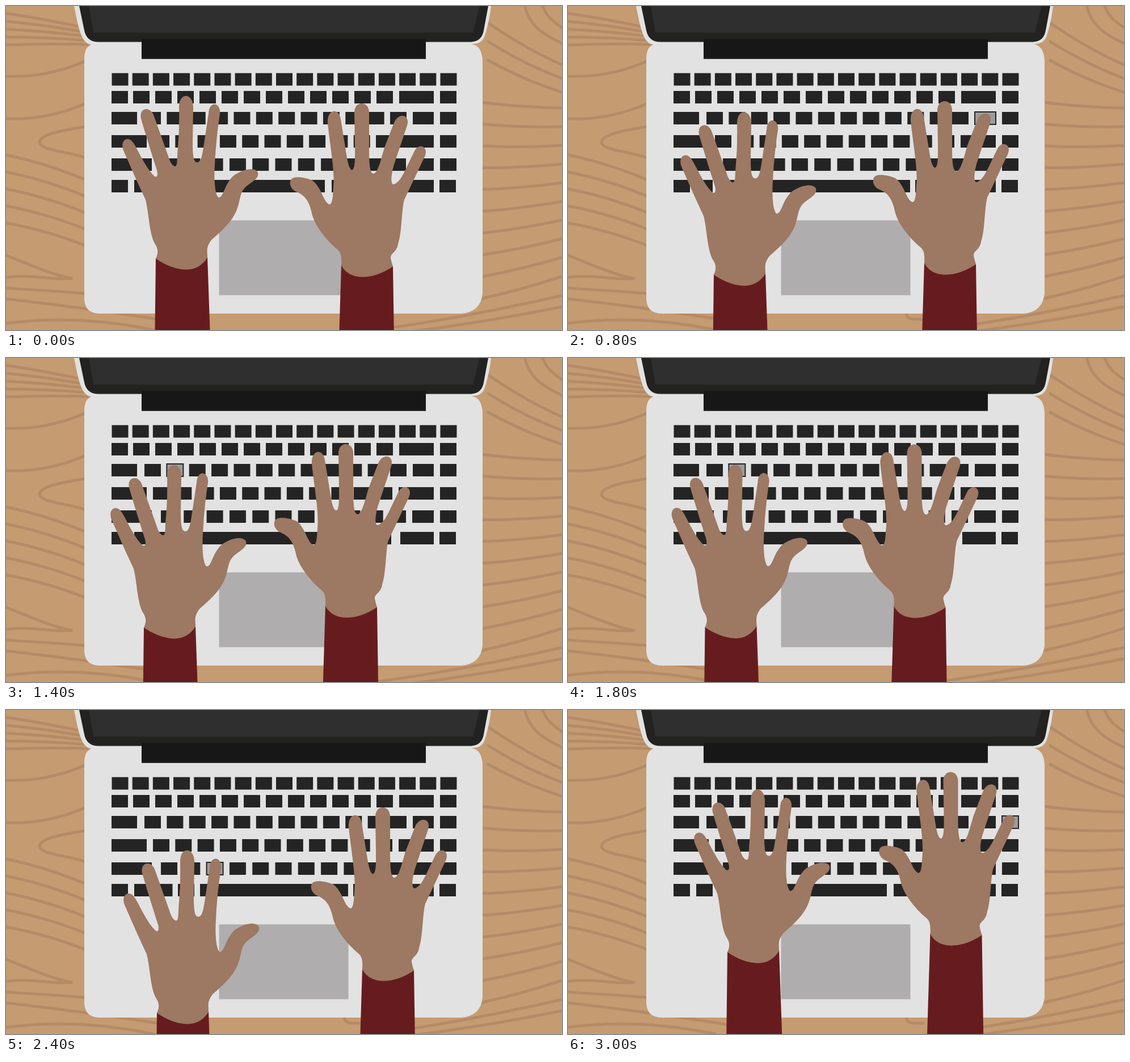
Recreate the animation shown at these times as an HTML page. Size 980 by 572 pixels, loop 3200 ms.

```html
<!DOCTYPE html>
<html>
<head>
<meta charset="utf-8">
<title>Typing hands</title>
<style>
html, body { margin: 0; width: 100%; height: 100%; overflow: hidden; background: #c59b72; }
svg { display: block; }
#grain { fill: none; stroke: #b58a67; stroke-width: 5; stroke-linecap: round; }
.sleeve { fill: #661c1e; }
.skin { fill: #9d7862; }
</style>
</head>
<body>
<svg width="980" height="572" viewBox="0 0 980 572">
  <rect width="980" height="572" fill="#c59b72"/>
  <g id="grain">
    <path d="M140,213C95,220 60,227 59,241C62,255 105,256 140,268M0,440C40,456 85,476 117,481C80,484 40,473 0,479M597,540C595,555 608,553 626,553M915,0C921,35 950,52 980,66M946,0C952,18 965,28 980,38"/>
  </g>
  <path fill="#e2e2e2" d="M120,0C127,34 132,68 151,68Q138,72 138,94V517Q139,543 165,543H803Q837,540 840,507V100Q840,70 820,67Q839,68 844,52Q852,27 855,0Z"/>
  <path fill="#222220" d="M129,0L138,43Q142,63.500 163,63.500H820Q839,62 842,43L850,0Z"/>
  <path fill="#2f2f2f" d="M146,0L154,47H823L835,0Z"/>
  <path fill="#171717" d="M239,58H740V93.500H239Z"/>
  <path fill="#afadae" d="M375.500,378.500H603.500V510.500H375.500Z"/>
  <g id="keys" fill="#242424"></g>
  <rect id="lit" height="22" fill="#9c9c9b" stroke="#242424" stroke-width="2"/>
  <g id="left">
    <path class="sleeve" d="M264,445L355,443L364,700H261Z"/>
    <path class="skin" d="M264,446C269,436 268,427 262,419C252,400 252,365 246,342Q238,325 228,303L207,255C203,245 206,236 213,235C220,234 224,240 229,249C240,270 250,290 262,301C267,303 268,298 266,290C258,265 247,230 238,199C234,180 253,176 260,192L286,265Q291,282 298,283C303,282 301,270 303,250Q306,215 305,180C304,152 329,152 330,178L329,240C329,262 330,276 337,276C344,276 346,262 348,250L357,190C358,166 379,170 377,190Q370,235 368,280C366,310 369,336 375,338C384,338 385,312 403,298C420,287 436,285 443,292C449,303 434,310 424,318C412,328 413,342 409,353C402,379 380,397 362,413C352,427 355,432 355,444Q342,465 318,465.500Q292,465 264,446Z"/>
  </g>
  <g id="right">
    <path class="sleeve" d="M591,457L682,459L686,720H583Z"/>
    <path class="skin" d="M591,458C592,440 590,434 582,428C566,414 547,392 540,370C535,345 528,335 512,328C499,322 498,308 505,304C512,300 530,303 540,308C556,320 558,343 569,350C576,352 576,335 577,320C580,295 571,245 567,207C565,182 587,178 590,200L600,262Q604,289 610,289.500C616,288 615,265 615,250L614,187C615,167 639,167 640,187L640,250C640,278 641,296 648,296C656,294 661,270 667,250L684,206C691,188 713,190 707,211L684,280C678,300 678,315 683,315C692,313 699,300 706,285L719,258C727,240 746,248 738,266L702,342C697,360 698,400 691,420C689,435 678,435 678,445Q680,454 682,460Q655,478 628,478.500Q602,478 591,458Z"/>
  </g>
</svg>
<script>
const $ = id => document.getElementById(id);
const set = (el, attrs) => { for (const k in attrs) el.setAttribute(k, attrs[k]); };
const add = (parent, tag, attrs) => {
  const el = document.createElementNS(parent.namespaceURI, tag);
  set(el, attrs);
  parent.append(el);
};

// Wood: fans of lines whose ends are evenly spaced on both sides of the laptop
function fan(n, x0, y0, gap0, x1, y1, gap1, bend) {
  for (let i = 0; i < n; i++) {
    const a = y0 + gap0 * i, b = y1 + gap1 * i;
    const x = (x0 + x1) / 2, y = (a + b) / 2 + bend;
    add($("grain"), "path", { d: `M${x0},${a}Q${x},${y} ${x1},${b}` });
  }
}
fan(5, 0, 13, 14, 145, 40, 7, -3);
fan(2, 0, 124, 75, 145, 95, 75, 18);
fan(5, 0, 263, 30, 145, 309, 29, -8);
fan(2, 0, 498, 19, 280, 520, 35, -3);
fan(2, 0, 560, 25, 260, 572, 25, -22);
fan(3, 850, 30, 33, 980, 104, 24, 8);
fan(10, 838, 170, 38.5, 980, 180, 33, 4);
fan(2, 650, 572, 10, 980, 511, 20, 8);

// Keyboard
const keys = [];
const key = (x, y, width = 29) => keys.push({ x, y, width });
function run(y, from, to, n) {
  for (let i = 0; i < n; i++) key(from + (to - from) * i / (n - 1), y);
}
function letterRow(y, firstWidth, from, n, wide) {
  key(186, y, firstWidth);
  run(y, from, wide - 40, n);
  key(wide, y, 754 - wide);
  key(765, y);
}
run(118.5, 186.5, 765.5, 17);
letterRow(150, 29, 224, 12, 693);
letterRow(187, 45, 244, 12, 717);
letterRow(228, 62, 259, 11, 692);
letterRow(269, 71, 273, 11, 716);
key(186, 307);
run(307, 226, 303, 3);
key(342, 307, 220);
run(307, 574, 650, 3);
key(695, 307, 59);
key(764, 307);
for (const k of keys) add($("keys"), "rect", { ...k, height: 22 });

const distance = (k, x, y) => Math.hypot(k.x + k.width / 2 - x, k.y + 11 - y);
const keyAt = (x, y) => keys.reduce((a, b) => distance(b, x, y) < distance(a, x, y) ? b : a);

// Fingertips of the resting hands
const tips = {
  left: { thumb: [437, 297], middle: [317, 166], ring: [368, 182] },
  right: { index: [579, 190], ring: [697, 200], pinky: [731, 256] }
};

// Key poses by step: offset of each hand, then the hand and finger that press
const STEP = 200, STEPS = 16;
const poses = {
  0: [[0, 0], [0, 0]],
  1: [[0, 0], [45, 3], "right", "ring"],
  2: [[-17, 64], [-6.5, -4], "right", "index"],
  3: [[-7, 36], [3.5, -23], "right", "index"],
  4: [[-7, 28.5], [37, -4], "right", "ring"],
  6: [[35.5, -59], [-11, 82], "left", "thumb"],
  7: [[-21, 30], [-28, -20], "left", "middle"],
  9: [[-22.5, 29.5], [-16.5, -19.5], "left", "middle"],
  10: [[-3, 10], [138, -43], "right", "index"],
  12: [[2, 89], [37, 0], "left", "ring"],
  14: [[-35, 25], [-34, -32], "right", "index"],
  15: [[17, -18.5], [47.5, -62.5], "right", "pinky"]
};

// Between key poses the left hand is halfway, the right hand nearly there
const lead = [0.5, 0.9];
function poseAt(step) {
  if (poses[step]) return poses[step];
  const from = poses[step - 1], to = poses[step + 1];
  return lead.map((p, hand) => from[hand].map((v, i) => v + (to[hand][i] - v) * p));
}

function draw(now) {
  const [left, right, hand, finger] = poseAt(Math.floor(now / STEP) % STEPS);
  const offset = { left, right };
  for (const id in offset) set($(id), { transform: `translate(${offset[id]})` });
  set($("lit"), { visibility: hand ? "visible" : "hidden" });
  if (hand) {
    const [x, y] = tips[hand][finger];
    set($("lit"), keyAt(x + offset[hand][0], y + offset[hand][1]));
  }
  requestAnimationFrame(draw);
}
draw(performance.now());
</script>
</body>
</html>
```
